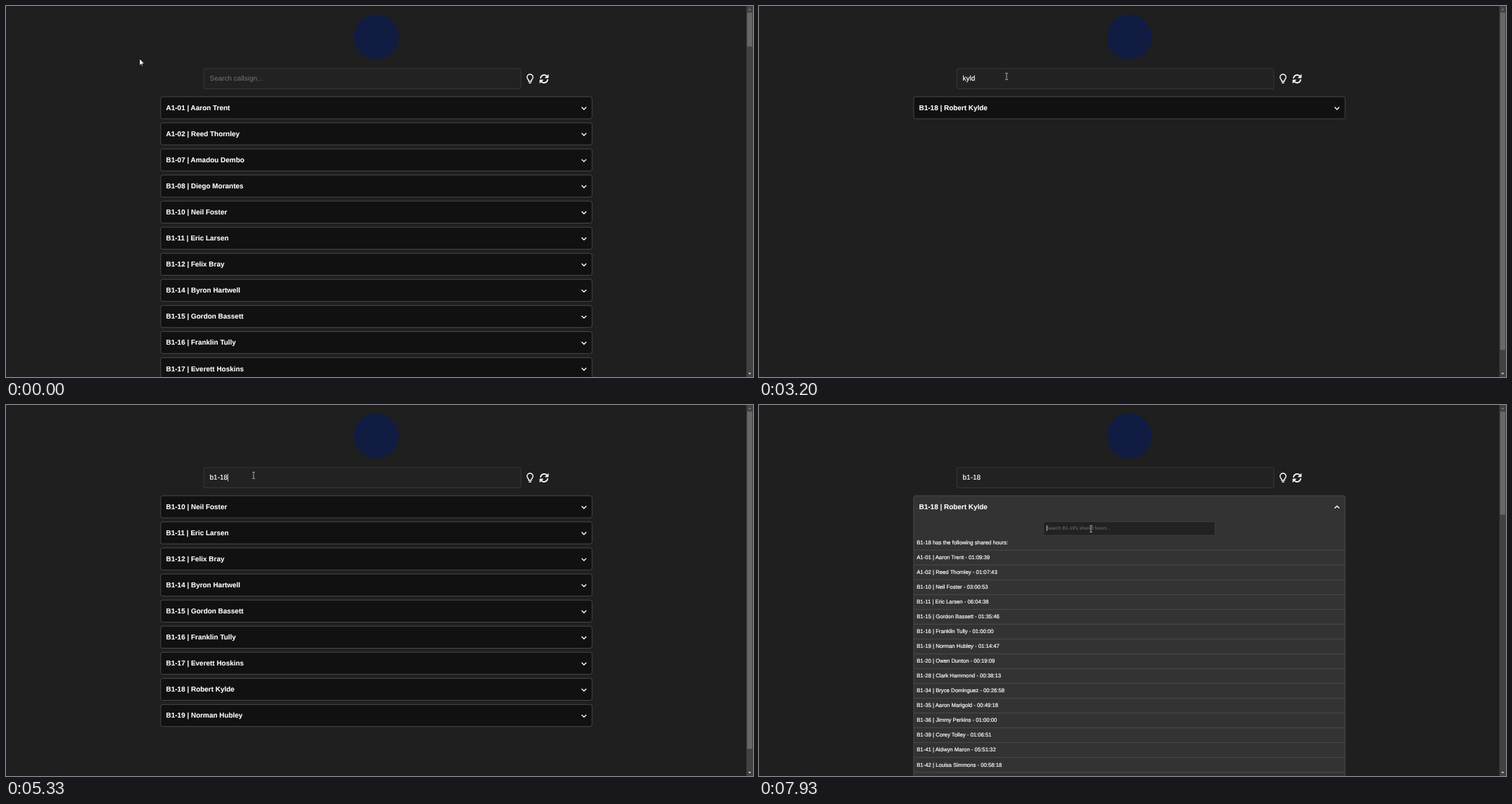
Recreate the animation shown at these times as an HTML page. Size 1062 by 527 pixels, loop 8000 ms.

```html
<!DOCTYPE html>
<html lang="en">
<head>
<meta charset="utf-8">
<title>Callsign search</title>
<style>
  html, body { margin: 0; height: 100%; overflow: hidden; background: #1f1f1f; }
  svg { display: block; width: 100%; height: 100%; }
  text { font: 9.956px "Liberation Sans", Arial, sans-serif; fill: #fff; stroke: #fff; stroke-width: .2; white-space: pre; text-rendering: geometricPrecision; }
  .name { font-weight: bold; stroke-width: .1; }
  .item { font-size: 7.744px; }
  .small { font-size: 6.6375px; }
  .hint { fill: #757575; stroke: none; }
  .line { fill: none; stroke: #fff; stroke-width: 1.4; stroke-linecap: round; stroke-linejoin: round; }
  .field { fill: #222; stroke: #444; stroke-width: .7; }
  .row { stroke: #555; stroke-width: .8; }
  .pointer { fill: #fff; stroke: #000; stroke-width: .6; stroke-linejoin: round; }
</style>
</head>
<body>
<svg viewBox="0 0 1062 527">
  <circle cx="526.5" cy="44" r="32" fill="#101c42"/>
  <rect class="field" x="281.2" y="88.7" width="450.8" height="29" rx="2.8"/>
  <g class="line">
    <path d="M743 107v-1.2c0-1.2-2.2-2.2-2.2-4.6a4.2 4.2 0 0 1 8.4 0c0 2.4-2.2 3.4-2.2 4.6v1.2z"/>
    <path d="M743.8 109.3h2.4"/>
    <path d="M760 102.2a5.2 5.2 0 0 1 9.4-2M770 104.8a5.2 5.2 0 0 1-9.4 2" stroke-width="1.8"/>
    <path d="M771 97.8v4.2h-4.2zM759 109.2v-4.2h4.2z" fill="#fff" stroke-width=".8"/>
  </g>
  <g id="list"></g>
  <g id="input"></g>
  <rect x="1052.6" width="9.4" height="527" fill="#424242"/>
  <path d="M1055.2 6l2.1-2.4 2.1 2.4z" fill="#777"/>
  <path d="M1055.2 521l2.1 2.4 2.1-2.4z" fill="#ccc"/>
  <rect id="thumb" x="1053.7" y="9.4" width="7.2" fill="#686868"/>
  <g id="cursor"></g>
</svg>
<script>
const LOOP = 8000, PRESS = 6730, OPEN = 6800;
const $ = id => document.getElementById(id);

const roster = `A1-01 Aaron Trent,A1-02 Reed Thornley,B1-07 Amadou Dembo,B1-08 Diego Morantes
B1-10 Neil Foster,B1-11 Eric Larsen,B1-12 Felix Bray,B1-14 Byron Hartwell,B1-15 Gordon Bassett
B1-16 Franklin Tully,B1-17 Everett Hoskins,B1-18 Robert Kylde,B1-19 Norman Hubley,B1-20 Owen Dunton
B1-28 Clark Hammond,B1-34 Bryce Dominguez,B1-35 Aaron Marigold,B1-36 Jimmy Perkins,B1-39 Corey Tolley
B1-41 Aldwyn Maron,B1-42 Louisa Simmons,B1-47 Oskar Finch,B1-52 Mark Tolland,C1-03 Derek Sloane
C1-08 Ricky Alton,C1-11 Blake Rowden,C1-15 Luke Farrow,D1-02 Jack Penrose`
  .split(/[,\n]/).map(s => s.replace(" ", " | "));

// Callsign and time shared
const hours = `A1-01 01:09:39,A1-02 01:07:43,B1-10 03:00:53,B1-11 06:04:38,B1-15 01:35:46
B1-16 01:00:00,B1-19 01:14:47,B1-20 00:19:09,B1-28 00:38:13,B1-34 00:26:58,B1-35 00:49:18
B1-36 01:00:00,B1-39 01:06:51,B1-41 05:51:32,B1-42 00:58:18`
  .split(/[,\n]/).map(s => {
    const [code, time] = s.split(" ");
    return `${roster.find(r => r.startsWith(code))} - ${time}`;
  });

// Time, text in the field, optional start of the caret blink
const keys = [
  [0, ""], [600, ""], [2130, "k"], [2265, "ky"], [2400, "kyl"], [2530, "kyld"], [2670, "kylde"],
  [3200, "kyld", 2670], [3330, "kyl"], [3465, "ky"], [3600, "k"], [3730, ""],
  [4330, "b"], [4465, "b1"], [4730, "b1-"], [5200, "b1-1"], [5330, "b1-18"]
];
const thumbs = { "": 48, k: 130, b: 90, b1: 100, "b1-": 100 };

// Pointer moves: start, end, from, to
const moves = [
  [40, 600, [190, 75], [352, 100]],
  [6150, 6400, [352, 100], [322.9, 148.8]],
  [6900, 7470, [322.9, 148.8], [472, 176]]
];
const pointers = {
  arrow: '<path class="pointer" d="M0 0v9.4l2.2-2 1.4 3.2 1.3-.6-1.4-3.1h3z"/>',
  hand: '<path class="pointer" d="M-1 1Q-1-.2 0-.2T1 1V4l3.2.6Q5.4 5 5.3 6.3L4.6 9.3V11H-.4V9.6L-3 6.4Q-3.1 5.2-1.9 5.4L-1 6.2z"/>',
  beam: '<path d="M-2-4.6h1.4l.6.5.6-.5H2M-2 4.6h1.4l.6-.5.6.5H2M0-4.1v8.2" fill="none" stroke="#ccc" stroke-width=".8"/>'
};

const text = (x, y, cls, s) => `<text x="${x}" y="${y}" class="${cls}">${s}</text>`;
const caret = (x, y, h) => `<rect x="${x}" y="${y}" width=".8" height="${h}" fill="#ddd"/>`;
const clamp = x => Math.max(0, Math.min(1, x));
const ease = x => x * x * (3 - 2 * x);

function row(label, i, fill, open) {
  const y = 128.9 + i * 37.06;
  const arrow = open ? "m-2.9 1.4 2.9-2.9 2.9 2.9" : "m-2.9-.9 2.9 2.9 2.9-2.9";
  return `<rect class="row" x="219.9" y="${y}" width="613.3" height="${open ? 420 : 31.3}" rx="2.8" fill="${fill}"/>`
    + text(227.6, y + 19, "name", label)
    + `<path class="line" d="M821.7 ${y + 16}${arrow}"/>`;
}

function panel() {
  const items = hours.map((s, i) => text(224.2, 219.1 + i * 21.03, "item", s));
  const rules = Array.from({ length: 16 }, (_, i) => `M220 ${206.2 + i * 21.03}h613`).join("");
  return '<rect class="field" x="404.3" y="165.8" width="244" height="19.2"/>'
    + text(408.6, 177.4, "small hint", "Search B1-18's shared hours...")
    + text(224.2, 198.1, "item", "B1-18 has the following shared hours:")
    + `<path d="${rules}" stroke="#555" stroke-width=".7"/>` + items.join("");
}

function pointer(t) {
  let [x, y] = moves[0][2];
  for (const [start, end, a, b] of moves) {
    if (t < start) break;
    const k = ease(clamp((t - start) / (end - start)));
    x = a[0] + (b[0] - a[0]) * k;
    y = a[1] + (b[1] - a[1]) * k;
  }
  const inField = x > 281 && y > 88 && y < 118;
  const inPanelField = t > OPEN && x > 404 && y > 165;
  const kind = inField || inPanelField ? "beam" : y > 128 && y < 161 ? "hand" : "arrow";
  return `<g transform="translate(${x} ${y})">${pointers[kind]}</g>`;
}

function put(id, html) {
  const el = $(id);
  if (el.shown !== html) el.innerHTML = el.shown = html;
}

function draw(now) {
  const t = now % LOOP, open = t >= OPEN;
  const [time, typed, blink = time] = keys.findLast(k => k[0] <= t);
  // The list follows the field a little later
  const query = keys.findLast(k => !k[0] || k[0] + (k[1] ? 68 : 138) <= t)[1];
  const found = roster.filter(r => r.toLowerCase().includes(query)).slice(0, 11);

  const shade = Math.round(17 + 34 * ease(clamp((t - 6330) / 330)));
  const fill = `rgb(${shade},${shade},${shade})`;
  let list = found.map((r, i) => row(r, i, fill, open)).join("");
  if (open) list += panel();
  if (t >= 7930) list += caret(408.8, 171, 8);
  put("list", list);

  put("input", typed ? text(289.6, 106.4, "", typed) : text(289.6, 106.4, "hint", "Search callsign..."));
  if (t >= 600 && t < PRESS && (t - blink) % 1060 < 530) {
    const width = typed ? $("input").firstChild.getComputedTextLength() : 0.5;
    $("input").insertAdjacentHTML("beforeend", caret(289.7 + width, 97.6, 11));
    $("input").shown = null;
  }

  $("thumb").setAttribute("height", open ? 146.5 : thumbs[query] ?? 479);
  put("cursor", pointer(t));
  requestAnimationFrame(() => draw(performance.now() - begin));
}
const begin = performance.now();
draw(0);
</script>
</body>
</html>
```
